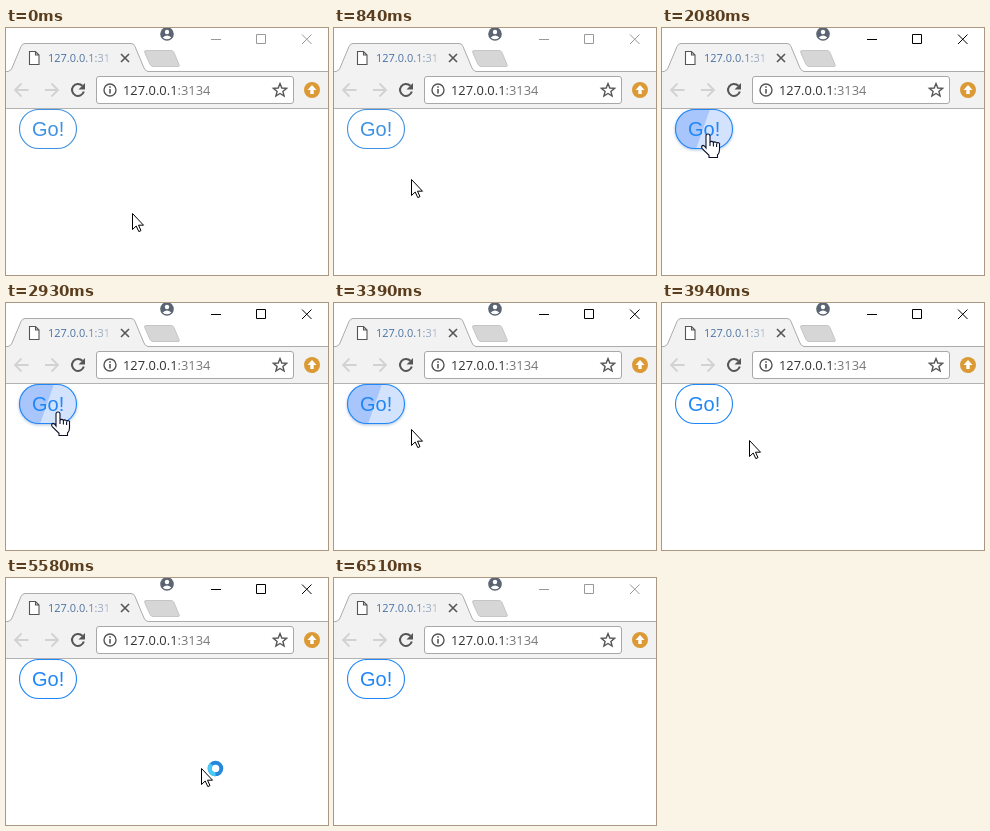
Recreate the animation shown at these times as an HTML page. Size 322 by 247 pixels, loop 6590 ms.

```html
<!DOCTYPE html>
<html lang="en">
<head>
<meta charset="utf-8">
<title>Go button</title>
<style>
  html, body { margin: 0; width: 100%; height: 100%; overflow: hidden; background: #fff; }
  svg { display: block; }
  text { white-space: pre; }
  .ui { font-family: "Open Sans", "Noto Sans", sans-serif; }
  .line { fill: none; stroke-width: 1; }
</style>
</head>
<body>
<svg width="322" height="247" viewBox="0 0 322 247">
  <defs>
    <linearGradient id="fade" gradientUnits="userSpaceOnUse" x1="42" x2="106" y1="0" y2="0">
      <stop offset="0" stop-color="#3d6fae"/>
      <stop offset=".6" stop-color="#54749c"/>
      <stop offset="1" stop-color="#c9ced6"/>
    </linearGradient>
    <clipPath id="pill"><rect x="13" y="81" width="58" height="40" rx="20"/></clipPath>
    <clipPath id="page"><rect y="81" width="322" height="166"/></clipPath>
    <filter id="blur" x="-30%" y="-30%" width="160%" height="160%"><feGaussianBlur stdDeviation="1.6"/></filter>
  </defs>

  <!-- tab strip -->
  <rect width="322" height="247" fill="#fff"/>
  <rect y="43" width="322" height="37" fill="#f2f2f2"/>
  <path d="M0 43.5H2Q5 43 6 40L15 18.5Q16.5 15.5 19 15.5H125Q128 15.5 129 18.5L138 40Q139.5 43.5 142 43.5H322" fill="#f2f2f2" stroke="#ababab"/>
  <path d="M3 44H141" stroke="#f2f2f2"/>
  <path d="M140 22.5H165Q167 22.5 168 24.5L173 36.5Q174 38.5 172 38.5H147Q145 38.5 144 36.5L138.7 24.5Q138 22.5 140 22.5Z" fill="#d6d6d6" stroke="#c6c6c6"/>
  <path d="M23.5 23.5H29.5L33 27V36.5H23.5ZM29.5 23.5V27H33" fill="#fff" stroke="#555" stroke-width="1.1"/>
  <text class="ui" x="42" y="34" font-size="11" fill="url(#fade)">127.0.0.1:31</text>
  <path d="M115 26L123 34M123 26L115 34" stroke="#555" stroke-width="1.6"/>
  <circle cx="161" cy="6" r="6.8" fill="#5a6472"/>
  <circle cx="161" cy="4" r="2.2" fill="#fff"/>
  <path d="M156.7 9.4Q161 5.6 165.3 9.4Q161 13.2 156.7 9.4Z" fill="#fff"/>
  <path id="controls" class="line" d="M205 11.5H215M250.5 6.5H259.5V15.5H250.5ZM296 6.5L305.5 16M305.5 6.5L296 16"/>

  <!-- toolbar -->
  <g fill="none" stroke-width="1.8">
    <path d="M22.5 62H9.5M15.5 55.5L9 62L15.5 68.5M39 62H52M45.5 55.5L52 62L45.5 68.5" stroke="#d2d2d2"/>
    <path d="M76.4 57.8A6 6 0 1 0 77.8 63.5" stroke="#555" stroke-width="2"/>
  </g>
  <path d="M79 55V61.5H72.5Z" fill="#555"/>
  <rect x="90.5" y="48.5" width="197" height="27" rx="2.5" fill="#fff" stroke="#a8a8a8"/>
  <circle cx="104" cy="62" r="6" fill="none" stroke="#555" stroke-width="1.4"/>
  <path d="M104 61V65.5M104 58.2V59.8" stroke="#555" stroke-width="1.6"/>
  <text class="ui" x="117" y="67" font-size="12.9" fill="#333">127.0.0.1<tspan fill="#777">:3134</tspan></text>
  <path d="M274 55.6L275.8 60L280.6 60.3L276.9 63.4L278.1 68L274 65.5L269.9 68L271.1 63.4L267.4 60.3L272.2 60Z" fill="none" stroke="#555" stroke-width="1.4"/>
  <circle cx="306" cy="62" r="8" fill="#db9a35"/>
  <path d="M306 57L310.5 62H307.7V66H304.3V62H301.5Z" fill="#fff"/>
  <path d="M0 80.5H322" stroke="#b2b2b2"/>

  <!-- button -->
  <g clip-path="url(#page)">
    <rect id="shadow" x="13" y="82" width="58" height="40" rx="20" fill="#6f93bd" filter="url(#blur)"/>
  </g>
  <rect x="13" y="81" width="58" height="40" rx="20" fill="#fff"/>
  <g id="fill" clip-path="url(#pill)">
    <rect x="13" y="81" width="58" height="40" fill="#d3e2fd"/>
    <g id="edge">
      <path d="M-60 81H48L34 121H-60Z" fill="#a8c5fc"/>
      <path id="streak" d="M48 81H56L42 121H34Z" fill="#fff"/>
    </g>
  </g>
  <g id="ink">
    <rect x="13.5" y="81.5" width="57" height="39" rx="19.5" fill="none" stroke="currentColor" stroke-width="1.1"/>
    <text x="26" y="108" font-family="'Liberation Sans', Arial, sans-serif" font-size="20" fill="currentColor">Go!</text>
  </g>

  <!-- pointer -->
  <g id="pointer">
    <path id="arrow" d="M.5 .5V16.5L4.2 13L6.8 18.6L9 17.6L6.5 12.2H11.5Z" fill="#fff" stroke="#000"/>
    <path id="hand" d="M-2 14V2A2 2 0 0 1 2 2V8.4A1.8 1.8 0 0 1 5.4 8.8A1.7 1.7 0 0 1 8.6 9.6A1.5 1.5 0 0 1 11.5 11V16Q11.5 19 9.5 21V23.5H1V21.3L-5.8 14.6Q-7.2 12 -5 11.4Q-3.8 11.3 -2 14ZM2 8V12M5.4 9V12.5M8.6 10V13" fill="#fff" stroke="#0a0f2a" stroke-width="1.1"/>
    <g id="busy" fill="none" stroke-width="4">
      <circle cx="14.5" cy=".5" r="5.8" fill="#fff" stroke="#2787dc"/>
      <path d="M14.5 6.3A5.8 5.8 0 0 1 10.4 -3.6" stroke="#4cc8f5"/>
    </g>
  </g>
</svg>
<script>
const LOOP = 6590;
const $ = id => document.getElementById(id);
const show = (id, on) => $(id).setAttribute("visibility", on ? "visible" : "hidden");
const set = (id, name, value) => $(id).setAttribute(name, value);

// Pointer moves: start, end, number of steps, then a cubic curve.
const moves = [
  { from: 70, to: 520, steps: 8, x: [126, 116, 92, 83], y: [185, 179, 164, 159] },
  { from: 750, to: 1370, steps: 9, x: [83, 78, 52, 46], y: [159, 154, 110, 106] },
  { from: 2930, to: 3560, steps: 9, x: [46, 65, 79, 87], y: [106, 114, 126, 137] },
  { from: 5420, to: 6050, steps: 9, x: [87, 223, 270, 273], y: [137, 195, 238, 262] }
];

// Button tint: [time, strength].
const tint = [[0, 0], [1150, .25], [1230, .5], [1310, .8], [1370, .9], [1450, .95], [1530, 1], [3880, .5], [3940, 0]];

const held = (table, t) => table.filter(row => row[0] <= t).pop()[1];

function bezier([a, b, c, d], p) {
  const q = 1 - p;
  return q * q * q * a + 3 * q * q * p * b + 3 * q * p * p * c + p * p * p * d;
}

function pointerAt(t) {
  const move = moves.filter(m => m.from <= t).pop();
  if (!move) return [moves[0].x[0], moves[0].y[0]];
  const step = (move.to - move.from) / (move.steps - 1);
  const k = Math.min(Math.floor((t - move.from) / step + .001), move.steps - 1);
  const p = (k + 1) / move.steps;
  return [bezier(move.x, p), bezier(move.y, p)].map(Math.round);
}

function render(t) {
  const [x, y] = pointerAt(t);
  const over = x > 13 && x < 71 && y > 81 && y < 121;
  set("pointer", "transform", `translate(${x} ${y})`);
  show("pointer", t < 6050);
  show("arrow", !over);
  show("hand", over);
  show("busy", t >= 5270 && t < 6050);

  const h = held(tint, t);
  const entering = t < 1530;
  set("fill", "opacity", h);
  set("edge", "transform", `translate(${entering ? -30 * (1 - h) : 0} 0)`);
  set("streak", "opacity", entering ? Math.min(1, 3 * (1 - h)) : 0);
  set("shadow", "opacity", t < 1450 || t >= 3940 ? 0 : t < 1530 || t >= 3880 ? .3 : .6);
  set("ink", "color", t < 1370 ? "#3f92e2" : "#2187f6");
  set("controls", "stroke", t >= 2080 && t < 6510 ? "#000" : "#999");
}

const start = performance.now();
function tick() {
  render((performance.now() - start) % LOOP);
  requestAnimationFrame(tick);
}
tick();
</script>
</body>
</html>
```
